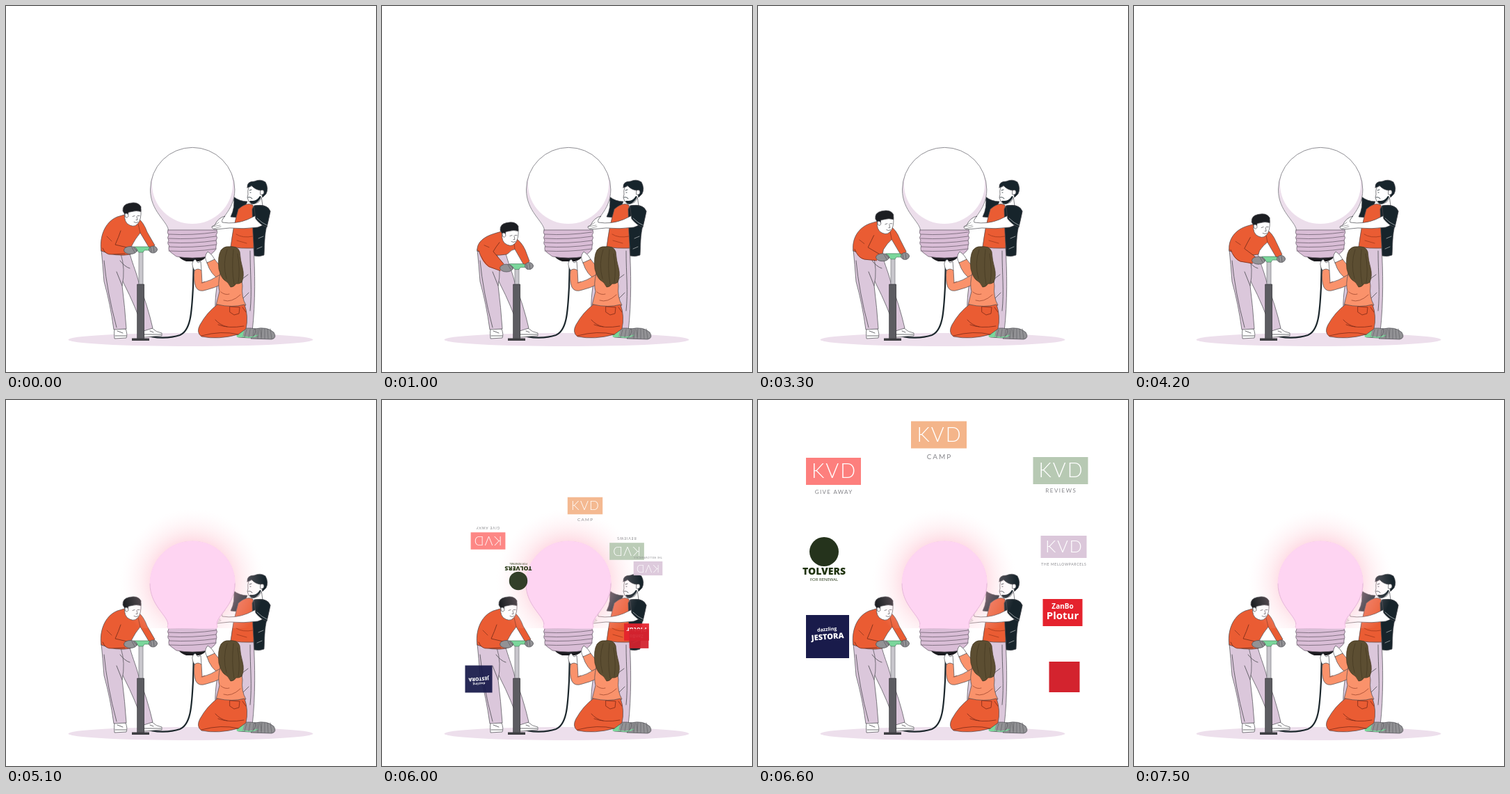
Write an HTML page with a canvas that moves like this. It is 532 px wide and 526 px high and loops after 8300 ms.

```html
<!DOCTYPE html>
<html lang="en">
<head>
<meta charset="utf-8">
<title>Pumping up an idea</title>
<style>
html, body { margin: 0; width: 100%; height: 100%; overflow: hidden; background: #fff; }
canvas { display: block; width: 532px; height: 526px; }
</style>
</head>
<body>
<canvas id="stage"></canvas>
<script>
const W = 532, H = 526, LOOP = 8300, STEP = 100, PUMP = 1850;
const canvas = document.getElementById('stage');
const ctx = canvas.getContext('2d');
const dpr = window.devicePixelRatio || 1;
canvas.width = W * dpr;
canvas.height = H * dpr;

const INK = '#4a4a4f', DARK = '#17242b', ORANGE = '#ea5c33', LILAC = '#dbc7db',
      PEACH = '#fa926b', GREY = '#929295', GREEN = '#7ad79b', HAIR = '#5c4e32';
const SANS = 'Lato, "Open Sans", sans-serif', HEAVY = '"Open Sans", Roboto, sans-serif';

const clamp = v => Math.max(0, Math.min(1, v));
const ease = v => (1 - Math.cos(Math.PI * clamp(v))) / 2;

function shape(d, fill, stroke = INK, width = 0.7) {
  const p = new Path2D(d);
  if (fill) { ctx.fillStyle = fill; ctx.fill(p); }
  if (stroke) { ctx.strokeStyle = stroke; ctx.lineWidth = width; ctx.stroke(p); }
}
const line = (d, color = INK, width = 0.8) => shape(d, null, color, width);

function oval(x, y, rx, ry, fill, stroke) {
  ctx.beginPath();
  ctx.ellipse(x, y, rx, ry, 0, 0, Math.PI * 2);
  ctx.fillStyle = fill;
  ctx.fill();
  if (stroke) { ctx.strokeStyle = stroke; ctx.lineWidth = 0.7; ctx.stroke(); }
}

function box(x, y, w, h, fill) {
  ctx.fillStyle = fill;
  ctx.fillRect(x, y, w, h);
}

function text(s, x, y, font, color, spacing = 0) {
  ctx.font = font;
  ctx.letterSpacing = spacing + 'px';
  ctx.fillStyle = color;
  ctx.textAlign = 'center';
  ctx.textBaseline = 'middle';
  ctx.fillText(s, x + spacing / 2, y);
}

const BULB = 'M233.5 322C232 309 207.5 295 207.5 264A60.7 60.7 0 0 1 328.9 264C328.9 295 303 309 303 322Z';

function floor() {
  const g = ctx.createRadialGradient(266, 0, 20, 266, 0, 110);
  g.addColorStop(0, '#e3c9e0');
  g.addColorStop(1, '#eddfec');
  oval(265.5, 479.5, 176, 9.5, '#eddfec');
  oval(266, 479, 110, 9, g);
}

function helper() {
  shape('M322 346L340 347L332 440L301 440C300 420 303 405 305 390Z', LILAC);
  shape('M324 346L356 347C358 380 359 425 354 468L338 468L332 400Z', LILAC);
  line('M351 352C351 385 354 410 351 438M340 392L348 386M341 420L349 412');
  shape('M327 274Q336 281 347 281L344 288Q336 294 332 304L323 303Q330 289 327 274Z', DARK);
  shape('M352 276L367 273L369 287L354 289Z', '#fff');
  shape('M334 292Q346 281 355 286L358 322L356 348Q338 349 323 346Q326 318 334 292Z', ORANGE);
  shape('M357 287Q376 284 380 295Q377 310 374 320C371 336 372 348 371 358Q364 361 357 359L355 325L354 292Z', DARK);
  line('M331 328Q340 334 355 331M332 337L346 341', '#a33a1d');
  line('M363 334L370 331M361 349L368 346', '#fff', 0.5);
  shape('M349 260Q347 266 348 271L347 275L349 281Q354 287 363 282L370 272L370 256Z', '#fff');
  shape('M347 261Q346 252 357 252Q366 248 373 253Q378 262 374 270L369 275L366 265Q358 264 353 258Q350 261 347 261Z', DARK);
  shape('M350 280Q352 286 358 284Q364 281 367 274L365 273Q361 280 355 280Z', DARK, null);
  shape('M366 265Q371 263 371 268Q370 272 366 271Z', '#fff');
  line('M350 265L353 264M351 268L352 268M348 275Q352 274 354 277', DARK);
}

function bulb() {
  shape(BULB, '#ecdeeb', null);
  ctx.save();
  ctx.clip(new Path2D(BULB));
  oval(268, 256, 58, 57, '#fff');
  ctx.restore();
  line(BULB, '#84848a', 0.9);
  shape('M246 357L290 357Q286 365 277 367L259 367Q250 364 246 357Z', '#1b1b1f', null);
  shape('M233 322L303 322Q305 326 302 329Q305 333 302 337Q304 341 302 345Q303 350 299 353L291 360Q268 364 245 360L237 354Q232 350 235 345Q231 341 234 337Q231 333 234 329Q231 326 233 322Z', '#d9bdd6', '#6f6272', 0.8);
  for (let i = 0; i < 5; i++) {
    const y = 327 + i * 6;
    line(`M234 ${y + 1}Q268 ${y + 3} 302 ${y - 2}`, '#7b6c7c', 0.9);
  }
}

function helperArm() {
  shape('M360 301L374 309Q372 315 362 318Q342 321 322 319L302 321Q296 321 296 317L300 315Q305 304 315 302Q309 308 311 311Q330 314 347 307Z', '#fff');
  line('M297 317L308 315M299 320L309 317M300 315L306 311', INK, 0.5);
  shape('M357 287Q376 284 380 295L375 318Q366 315 359 306Z', DARK);
  line('M361 305Q368 312 375 315', '#dfe3e5', 0.6);
}

function hose() {
  line('M199 472C215 479 238 477 250 473C267 466 267 435 269 404L270 364', '#1d282d', 2.2);
}

function woman() {
  shape('M290 370Q283 361 290 353Q298 358 301 367Z', '#fff');
  shape('M289 369L300 364Q306 373 314 378L308 394Q294 386 289 369Z', PEACH);
  shape('M271 380Q264 369 272 364L276 369L280 367L281 380Z', '#fff');
  shape('M271 380Q276 376 281 380L282 398Q294 395 308 386L310 400Q300 405 288 408Q277 412 273 404Q269 394 271 380Z', PEACH);
  shape('M308 384Q304 400 307 410Q304 422 302 430Q325 437 345 430Q338 418 340 402L337 380Z', PEACH);
  line('M309 411Q315 416 321 414M313 423Q324 427 337 415M281 398L286 396', '#a34a30');
  shape('M332 470Q338 462 352 463Q366 464 373 472Q372 478 350 477L334 476Z', GREY);
  shape('M358 464Q375 460 385 469Q390 477 382 479L352 478Q361 471 358 464Z', GREY);
  shape('M331 470Q336 463 343 463L340 476L332 476Z', GREEN, null);
  line('M341 475Q352 478 362 473', GREEN, 1.6);
  for (let i = 0; i < 5; i++) {
    line(`M${346 + i * 5} 465L${343 + i * 6} 476`, '#636368', 0.7);
    line(`M${364 + i * 4} 464L${362 + i * 5} 478`, '#636368', 0.7);
  }
  shape('M304 429Q289 440 279 458Q273 469 281 475Q306 480 334 472L345 464Q349 446 343 429Q325 434 304 429Z', ORANGE);
  line('M305 458Q320 464 342 460M281 474Q310 466 334 472M301 451Q308 459 318 461', '#7e2b18');
  line('M322 432L336 433L335 442L328 444L322 440ZM340 433L345 440', '#7e2b18');
  shape('M320 346Q333 344 336 353Q337 366 340 376Q343 388 339 397Q335 400 331 399Q328 404 323 404Q319 396 314 394Q309 390 306 378Q304 360 309 351Q314 345 320 346Z', HAIR, '#40341f');
  line('M318 350Q311 370 317 392M327 350Q324 378 328 400M333 356Q337 380 334 397', '#40341f', 0.6);
}

function trousers() {
  shape('M156 463L172 464Q175 472 173 477L156 478Q155 470 156 463Z', '#fff');
  shape('M198 464L210 463Q216 469 224 470L224 474L199 476Z', '#fff');
  line('M157 474L173 474M160 467L168 470M199 472L223 472M207 467L212 469');
  shape('M150 356L178 356C183 374 188 384 191 398Q204 432 211 463L198 467Q186 431 170 400Z', LILAC);
  shape('M137 350L165 356Q172 378 167 402Q171 434 173 464L155 465Q150 428 141 396Q139 370 137 350Z', LILAC);
  line('M141 366Q145 410 159 462M164 366Q171 375 178 377M167 402L159 382');
}

const handleY = u => 350 + 25 * u;

function pump(u) {
  const h = handleY(u);
  box(191, h, 6, 402 - h, '#c8c6cc');
  line(`M191 ${h}V402M197 ${h}V402`, '#67676c', 0.6);
  box(189, 400, 9.5, 79, '#5c5c61');
  line('M189 400H198.5V479H189Z', '#39393d', 0.8);
  box(181, 477.5, 25, 3.5, '#3f3f43');
  shape(`M184 ${h - 4}H208V${h + 1}H199L197 ${h + 4}H191L189 ${h + 1}H184Z`, GREEN, '#4b7c60');
}

function pumper(u) {
  const m = (a, b) => (a + (b - a) * u).toFixed(2);
  const p = (ax, ay, bx, by) => m(ax, bx) + ' ' + m(ay, by);
  const h = handleY(u);
  // torso and far arm
  shape(`M137 352C${p(134, 336, 136, 343)} ${p(140, 311, 142, 333)} ${p(160, 303, 163, 327)}
    L${p(170, 300, 173, 324)}Q${p(179, 315, 181, 342)} ${p(190, 305, 190, 333)}
    Q${p(198, 311, 200, 338)} ${p(203, 325, 206, 351)}L${p(214, 344, 212, 367)}
    Q${p(210, 348, 208, 373)} ${p(205, 346, 203, 371)}L${p(193, 326, 191, 350)}
    Q${p(186, 334, 187, 350)} ${p(180, 346, 181, 356)}L179 357Q158 361 137 352Z`, ORANGE);
  // near forearm
  shape(`M${p(139, 342, 139, 346)}Q${p(140, 357, 141, 366)} ${p(151, 357, 153, 375)}
    L${p(171, 356, 170, 381)}L${p(174, 347, 175, 371)}L${p(157, 343, 160, 353)}`, ORANGE, null);
  line(`M${p(139, 348, 139, 352)}Q${p(143, 358, 144, 367)} ${p(152, 357, 154, 375)}
    L${p(171, 356, 170, 381)}M${p(174, 347, 175, 371)}L${p(157, 343, 160, 353)}
    Q${p(162, 332, 164, 346)} ${p(165, 323, 169, 340)}`, '#6f2a18');
  line(`M${p(193, 326, 191, 350)}L${p(190, 313, 190, 341)}M${p(145, 331, 147, 344)}L${p(152, 338, 154, 347)}`, '#6f2a18', 0.6);
  // head
  ctx.save();
  ctx.translate(2 * u, 1.5 + 28.5 * u);
  shape('M172 291Q168 304 174 311Q183 318 189 312Q195 306 194 291Z', '#fff');
  shape('M168 293Q167 284 177 282Q190 279 194 287L194 294Q187 292 181 294L176 295L175 301L171 298Z', '#1c1e22');
  shape('M171 297Q175 295 176 300Q175 304 172 302Z', '#fff');
  line('M182 301L185 300M189 300L192 300M188 301L189 306L187 306M184 309Q187 311 190 309', INK, 0.7);
  ctx.restore();
  // gloves
  oval(179, h + 1 + u, 9.5, 5.5, GREY, INK);
  oval(211.5, h - u, 6, 5, GREY, INK);
  line(`M184 ${h - 2}L189 ${h + 3}M181 ${h - 3}L185 ${h + 4}M208 ${h - 3}L209 ${h + 4}M212 ${h - 4}L213 ${h + 4}`, '#58585d', 0.7);
}

function glow(a) {
  if (!a) return;
  ctx.save();
  ctx.globalAlpha = a;
  const g = ctx.createRadialGradient(268, 260, 56, 268, 260, 104);
  g.addColorStop(0, 'rgba(253,184,202,.5)');
  g.addColorStop(0.35, 'rgba(254,200,211,.3)');
  g.addColorStop(0.7, 'rgba(255,218,226,.14)');
  g.addColorStop(1, 'rgba(255,235,240,0)');
  ctx.fillStyle = g;
  ctx.fillRect(160, 150, 216, 178);
  shape(BULB + 'M233 321H303V328H233Z', '#fed4f2', '#fed4f2', 1.6);
  line('M207 264C207 295 232 309 233 322M329 264C329 295 303 309 303 322', '#d9a9cb', 0.6);
  ctx.restore();
}

function plate(w, h, color, label, dy, size, spacing) {
  box(-w / 2, -h / 2, w, h, color);
  text('KVD', 0, 1, `300 ${h * 0.74}px ${SANS}`, '#fff', 2);
  text(label, 0, dy, `${size}px ${SANS}`, '#85858a', spacing);
}

// x, y: resting place; dx, dy: drift per unit of travel; turn: half turns
const cards = [
  { x: 260, y: 50, dx: 32, dy: 102, turn: 0, draw: () => plate(80, 39, '#f4b58a', 'CAMP', 32, 10, 2) },
  { x: 108.5, y: 102.5, dx: 44, dy: 100, turn: 1, draw: () => plate(79, 39, '#fd7f7d', 'GIVE AWAY', 30, 8, 1.3) },
  { x: 435, y: 101.5, dx: -83, dy: 116, turn: 1, draw: () => plate(79, 39, '#b7c9b3', 'REVIEWS', 29.5, 8, 1.5) },
  { x: 439.5, y: 211, dx: -57, dy: 31, turn: 1, draw: () => plate(66, 32, '#dbc7da', 'THE MELLOWPARCELS', 25, 5, 0.7) },
  { x: 95, y: 229, dx: 101, dy: 24, turn: 1, draw() {
    oval(0, -11, 21, 21, '#25331c');
    text('TOLVERS', 0, 18, `800 14px ${HEAVY}`, '#20330f');
    text('FOR RENEWAL', 0, 29, `6px ${HEAVY}`, '#20330f');
  } },
  { x: 100, y: 340, dx: 39, dy: 61, turn: 1, draw() {
    box(-31, -31, 62, 62, '#191b4b');
    ctx.rotate(-0.08);
    text('dazzling', 0, -10, `700 7px ${HEAVY}`, '#fff');
    text('JESTORA', 0, 1, `800 11px ${HEAVY}`, '#fff');
  } },
  { x: 438, y: 305.5, dx: -72, dy: 28, turn: 1, draw() {
    box(-28.5, -19.5, 57, 39, '#e5222d');
    text('ZanBo', 0, -8, `700 10px ${HEAVY}`, '#fff');
    text('Plotur', 0, 6, `700 15px ${HEAVY}`, '#fff');
  } },
  { x: 440.5, y: 398, dx: -71, dy: -55, turn: 1, draw: () => box(-22, -22, 44, 44, '#d3232e') }
];

function showCards(t) {
  if (t < 5600 || t >= 7300) return;
  const k = t < 6650 ? Math.max(0, (6600 - t) / 600) : Math.max(0, (t - 6700) / 400);
  const alpha = clamp((1.75 - k) / 0.8);
  for (const c of cards) {
    ctx.save();
    ctx.globalAlpha = alpha;
    ctx.translate(c.x + c.dx * k, c.y + c.dy * k);
    ctx.rotate(Math.PI * c.turn * k);
    const s = 1 - 0.37 * k;
    ctx.scale(s, s);
    c.draw();
    ctx.restore();
  }
}

function stroke(t) {
  if (t < 4600) return (1 - Math.cos(2 * Math.PI * t / PUMP)) / 2;
  return 1 - ease((t - 4600) / 400);
}

function render(t) {
  const u = stroke(t);
  ctx.setTransform(dpr, 0, 0, dpr, 0, 0);
  ctx.lineJoin = ctx.lineCap = 'round';
  box(0, 0, W, H, '#fff');
  floor();
  helper();
  bulb();
  helperArm();
  hose();
  woman();
  trousers();
  pump(u);
  pumper(u);
  glow(clamp((t - 4600) / 500));
  showCards(t);
}

const start = performance.now();
function tick() {
  const t = (performance.now() - start) % LOOP;
  render(Math.floor(t / STEP) * STEP);
  requestAnimationFrame(tick);
}
tick();
</script>
</body>
</html>
```
